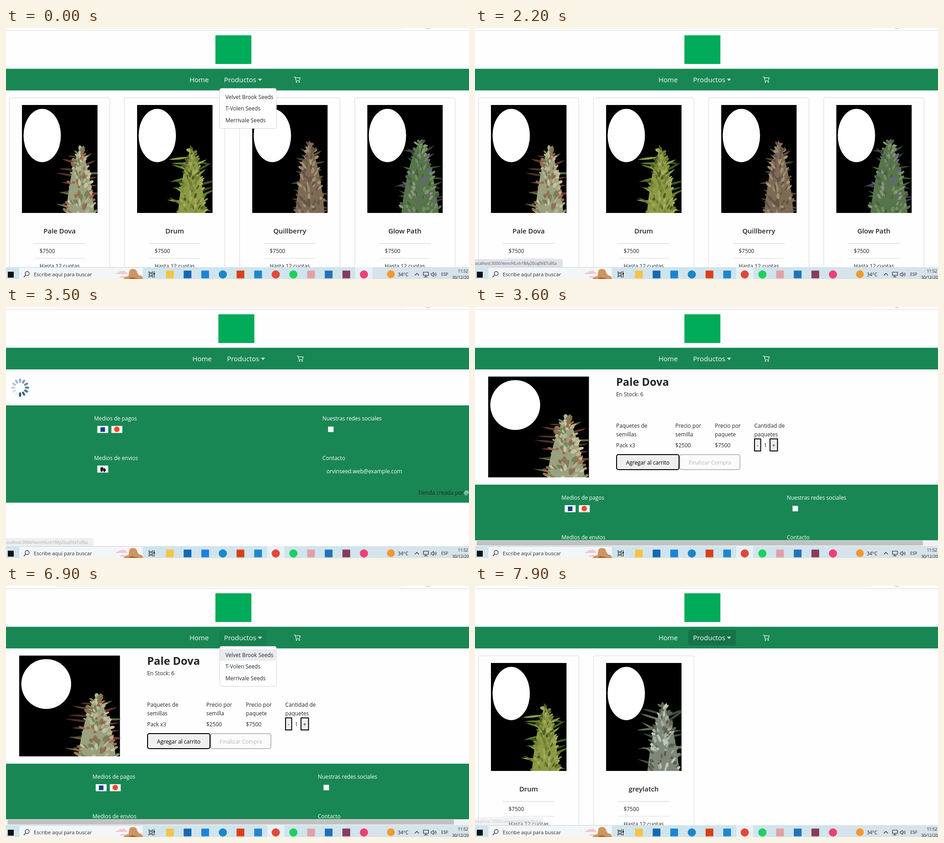
These frames come from a looping animation (1017 px wide and 551 px high, 8000 ms). An HTML page:

```html
<!DOCTYPE html>
<html lang="es">
<head>
<meta charset="utf-8">
<title>Tienda de semillas</title>
<style>
html, body { margin: 0; width: 100%; height: 100%; overflow: hidden; background: #fefefe; }
svg { display: block; width: 1017px; height: 551px; }
text { font-family: "Open Sans", "Noto Sans", sans-serif; white-space: pre; }
</style>
</head>
<body>
<svg id="stage" viewBox="0 0 1017 551" width="1017" height="551"></svg>
<script>
const GREEN = '#198754', INK = '#212529', BODY = 11.9, NAV = 14.95;
const LOOP = 8000, TICK = 100;

const rect = (x, y, w, h, fill, extra = '') =>
  `<rect x="${x}" y="${y}" width="${w}" height="${h}" fill="${fill}" ${extra}/>`;
const disc = (x, y, r, fill) => `<circle cx="${x}" cy="${y}" r="${r}" fill="${fill}"/>`;
const label = (x, y, str, fill = INK, size = BODY, extra = '') =>
  `<text x="${x}" y="${y}" fill="${fill}" font-size="${size}" ${extra}>${str}</text>`;
const line = (d, stroke, width = 1, extra = '') =>
  `<path d="${d}" fill="none" stroke="${stroke}" stroke-width="${width}" ${extra}/>`;
const group = (id, inner, extra = '') => `<g id="${id}" ${extra}>${inner}</g>`;
const centered = 'text-anchor="middle"';

function random(seed) {
  return () => (seed = (seed * 16807) % 2147483647) / 2147483647;
}

// Plant pictures, drawn on a 166 x 237 black sheet
const plants = {
  pale:  { seed: 77,  x: 128, y: 93, w: 31, reach: 44, buds: ['#9aa17f', '#b9b491', '#8a6b4f', '#6f8558', '#c6c2a2', '#9c6c50'], leaves: ['#4b3128', '#5f6b3c', '#6b3a2c'] },
  drum:  { seed: 191, x: 120, y: 93, w: 30, reach: 48, buds: ['#8d9a45', '#6f7f33', '#a8ab5e', '#4d5c24', '#7c8a3e'], leaves: ['#5d7a2a', '#8aa04a', '#3f571f'] },
  berry: { seed: 310, x: 127, y: 85, w: 32, reach: 30, buds: ['#7d6a55', '#9b8a72', '#5c5a3c', '#84684f', '#6b4d57', '#a3946f'], leaves: ['#4a4a2c', '#6a4a3c'] },
  glow:  { seed: 428, x: 116, y: 78, w: 41, reach: 42, buds: ['#56754a', '#728f5e', '#66677a', '#476239', '#8a967c'], leaves: ['#2f4a2a', '#4a6a3c', '#44404f'] },
  latch: { seed: 533, x: 126, y: 91, w: 35, reach: 52, buds: ['#7d8878', '#a6ada0', '#55624f', '#c2c5bd', '#6a5f4c'], leaves: ['#5f6f58', '#414d3c', '#7d8a76'] }
};

function plant({ seed, x, y, w, reach, buds, leaves }) {
  const rnd = random(seed * 9973);
  const pick = list => list[Math.floor(rnd() * list.length)];
  const half = v => 4 + w * Math.pow(v, 0.65);
  let out = '';
  for (let i = 0; i < 18; i++) {
    const v = 0.15 + 0.85 * i / 17, side = i % 2 ? 1 : -1;
    const len = half(v) * 0.6 + reach * (0.45 + 0.5 * rnd());
    const turn = side * (50 + 55 * rnd());
    out += `<path d="M0 0Q5 ${-len / 2} 0 ${-len}Q-5 ${-len / 2} 0 0" fill="${pick(leaves)}" transform="translate(${x} ${y + v * (237 - y)}) rotate(${turn})"/>`;
  }
  const h = 237 - y;
  out += `<path d="M${x} ${y}Q${x + w * 0.7} ${y + h * 0.3} ${x + w} 237H${x - w}Q${x - w * 0.7} ${y + h * 0.3} ${x} ${y}" fill="${buds[0]}"/>`;
  for (let i = 0; i < 130; i++) {
    const v = rnd(), s = rnd() * 2 - 1;
    out += `<ellipse rx="${1.5 + 2 * rnd()}" ry="${3 + 5 * rnd()}" fill="${pick(buds)}" transform="translate(${x + s * half(v)} ${y + v * h}) rotate(${s * 60})"/>`;
  }
  return out;
}

const photo = (name, x, y, w, h) =>
  `<svg x="${x}" y="${y}" width="${w}" height="${h}" viewBox="0 0 166 237" preserveAspectRatio="none">` +
  rect(0, 0, 166, 237, '#000') + plant(plants[name]) +
  '<ellipse cx="44.5" cy="67" rx="41" ry="58.5" fill="#fff"/></svg>';

function card(slot, title, name) {
  const x = 7 + slot * 252.8, mid = x + 110.7;
  return rect(x + 0.5, 153, 220.5, 420, '#fefefe', 'rx="4" stroke="#d6d6d6"') +
    photo(name, x + 28, 169, 166, 237) +
    label(mid, 450.5, title, INK, 14.9, `${centered} font-weight="600"`) +
    rect(x + 54, 472.5, 113.5, 1, '#cfcfcf') +
    label(x + 66.7, 494, '$7500') +
    rect(x + 54, 505, 113.5, 1, '#dcdcdc') +
    label(x + 66.7, 526.5, 'Hasta 12 cuotas');
}

function footer(left, right, y, height) {
  const chip = (x, dy) => rect(x, y + dy, 24, 15.5, '#f6f6f6');
  const white = (x, dy, s) => label(x, y + dy, s, '#fff');
  return rect(0, y, 1017, height, GREEN) +
    white(left, 33, 'Medios de pagos') +
    chip(left + 7, 45) + rect(left + 14, y + 48, 10, 10, '#1a3f8f') +
    chip(left + 38, 45) + disc(left + 50, y + 52.5, 6, '#ee4a23') +
    white(right, 33, 'Nuestras redes sociales') +
    rect(right + 12.5, y + 46.5, 12, 12, '#fff') +
    white(left, 120, 'Medios de envios') +
    chip(left + 7, 132) +
    `<path d="M${left + 14} ${y + 136}h6v8h-6zM${left + 20.5} ${y + 138}h3l2 3v3h-5z" fill="#111"/>` +
    disc(left + 16.5, y + 144.5, 1.6, '#111') + disc(left + 22.5, y + 144.5, 1.6, '#111') +
    white(right, 120, 'Contacto') +
    white(right + 9, 149, 'orvinseed.web@example.com') +
    label(905, y + 196, 'Tienda creada por') +
    label(1006, y + 196, '@', '#fff', BODY, 'font-weight="600"');
}

function spinner() {
  let out = '';
  for (let i = 0; i < 12; i++)
    out += `<ellipse class="petal" cx="31" cy="161.8" rx="2.5" ry="5" fill="#1b5583" transform="rotate(${i * 30} 31 177)"/>`;
  return out;
}

function detail() {
  const column = (x, a, b, c) => label(x, 265, a) + label(x, 284, b) + label(x, 308, c);
  const button = (x, y, w, h, str, r, ink, edge, fill) =>
    rect(x + 1, y + 1, w - 2, h - 2, fill, `rx="${r}" stroke="${edge}" stroke-width="2"`) +
    label(x + w / 2, y + h / 2 + 5, str, ink, BODY, centered);
  return photo('pale', 29, 152.5, 221.5, 221.5) +
    label(310, 172.5, 'Pale Dova', INK, 23.7, 'font-weight="700"') +
    label(310, 195.5, 'En Stock: 6') +
    column(310, 'Paquetes de', 'semillas', 'Pack x3') +
    column(440, 'Precio por', 'semilla', '$2500') +
    column(527, 'Precio por', 'paquete', '$7500') +
    column(613.5, 'Cantidad de', 'paquetes', '') +
    button(613, 288.5, 15.5, 28.5, '-', 0, '#111', '#000', '#efefef') +
    label(634.5, 308, '1') +
    button(647, 288.5, 18.5, 28.5, '+', 0, '#111', '#000', '#efefef') +
    button(310, 323, 139, 35, 'Agregar al carrito', 4, '#000', '#000', '#efefef') +
    button(449, 323, 134, 35, 'Finalizar Compra', 4, '#b9b9b9', '#bcbcbc', '#fbfbfb') +
    footer(190, 685, 390, 122) +
    rect(0, 512, 1017, 13, '#f1f1f1') + rect(4, 513, 980, 10.5, '#c1c1c1');
}

function header() {
  const hover = (id, x, w) => rect(x, 96, w, 34.5, '#157347', `id="${id}" rx="4"`);
  return rect(0, 0, 1017, 137, '#fefefe') +
    rect(0, 5, 1017, 1, '#dcdcde') +
    rect(106, -20, 772, 21.5, '#f1f3f4', 'rx="9"') +
    '<path d="M921 0h12q-6 3 -12 0" fill="#b5c3cb"/>' +
    rect(0, 89.5, 1017, 47.5, GREEN) +
    group('bar',
      rect(460, 16, 79, 63, '#00ab59') +
      hover('homeHover', 393, 75.5) + hover('listHover', 468.5, 104.5) +
      label(403, 119, 'Home', '#fff', NAV) + label(479, 119, 'Productos', '#fff', NAV) +
      '<path d="M553.5 111.5h9l-4.500 4.500z" fill="#fff"/>' +
      line('M632.500 107.500h2.500l2.200 8h7.300l1.800-6.200h-10.500', '#fff', 1.200) +
      disc(638, 118.500, 1.400, '#fff') + disc(644, 118.500, 1.400, '#fff'));
}

function menu() {
  return rect(469.5, 132.5, 124.5, 88, '#fff', 'rx="4" stroke="#cfd2d1"') +
    rect(470, 138.5, 123.5, 25.5, '#e9ecef', 'id="itemHover"') +
    ['Velvet Brook Seeds', 'T-Volen Seeds', 'Merrivale Seeds']
      .map((s, i) => label(482, 156 + i * 25.4, s)).join('');
}

function taskbar() {
  const ink = '#1c1c1c';
  const icons = [
    ['s', '#f6c445'], ['s', '#1668b0'], ['s', '#1b84d8'], ['c', '#1c86c4'], ['s', '#dc3e15'],
    ['s', '#1f86cc'], ['c', '#e2483a'], ['c', '#1ed05f'], ['s', '#e3a0a4'], ['s', '#2272b8'],
    ['s', '#8a3a5a'], ['c', '#ee3f73']
  ];
  return rect(0, 525, 1017, 26, '#d0e4ee') + rect(790, 525, 227, 26, '#d6e3ea') +
    rect(574, 525, 37.5, 26, '#e6f1f6', 'id="browserTab"') +
    rect(767, 525, 38, 26, '#e6f1f6', 'id="recorderTab"') +
    rect(29.5, 525, 271, 26, '#f3f6f8') + rect(29.5, 525, 271, 1, '#c9ced1') +
    rect(4, 535, 13, 13, '#111') +
    `<circle cx="46.500" cy="539" r="4.300" fill="none" stroke="${ink}" stroke-width="1.200"/>` +
    line('M43.500 542l-4.500 5', ink, 1.300) +
    label(61, 545, 'Escribe aquí para buscar', '#2b2b2b', 11.2) +
    '<path d="M241 540q2-4 6-3q3-5 8-3q5-4 8 2q3 0 3 4zM250 548q2-4 7-3q4-2 7 3z" fill="#f3c6d0"/>' +
    '<path d="M258 551q3-6 11-6l2-11q1-5 8-5q8 0 9 8l4 6q8 0 9 8z" fill="#cf9560"/>' +
    '<path d="M270 551q2-5 9-4l12 4z" fill="#a96b3e"/>' +
    line('M314 534v3h8v-3M314 548v-3h8v3M314.500 539h7v4h-7zM325.500 534v14', ink, 1.200) +
    rect(324, 538, 3, 3, ink) +
    icons.map(([kind, fill], i) => {
      const x = 360 + i * 38.75;
      return kind === 'c' ? disc(x, 541, 9, fill) : rect(x - 8.5, 532.5, 17, 17, fill, 'rx="1"');
    }).join('') +
    disc(845.5, 540.5, 8.5, '#f19a2c') +
    label(860.5, 545, '34°C', ink, 10.6) +
    line('M898 543l4.500-4.500l4.500 4.500', ink, 1.200) +
    line('M917 536h11v7h-11zM922 543v3M918 546.500h8', ink, 1.200) +
    `<path d="M934 539h2l3-3v10l-3-3h-2z" fill="none" stroke="${ink}"/>` +
    line('M941 538.500q2 2.500 0 5M943.500 537q3 4 0 8', ink) +
    label(956, 544, 'ESP', ink, 8.8) +
    label(992.5, 537, '11:52', ink, 8.8) + label(980, 551, '30/12/2022', ink, 8.8);
}

const status = group('status',
  '<path id="tip" fill="#dee1e6" stroke="#cdd0d4" stroke-width=".6"/>' +
  '<text id="url" x="-2.200" y="520" fill="#55595e" font-size="8.600"></text>');

document.getElementById('stage').innerHTML =
  rect(0, 0, 1017, 551, '#fefefe') +
  group('catalog', card(0, 'Pale Dova', 'pale') + card(1, 'Drum', 'drum') +
    card(2, 'Quillberry', 'berry') + card(3, 'Glow Path', 'glow')) +
  group('category', card(0, 'Drum', 'drum') + card(1, 'greylatch', 'latch')) +
  group('loading', spinner() + footer(193.5, 695, 216, 213.5)) +
  group('detail', detail()) +
  header() + group('menu', menu()) + status + taskbar();

const el = id => document.getElementById(id);
const petals = [...document.querySelectorAll('.petal')];
const fade = (id, v) => el(id).setAttribute('opacity', v);
const show = (id, on) => el(id).setAttribute('display', on ? 'inline' : 'none');

// Value of the last [time, value] step reached
function at(t, steps) {
  let value = steps[0][1];
  for (const [time, v] of steps) if (t >= time) value = v;
  return value;
}

const host = 'localhost:3000';
const tips = {
  home: [host, 60],
  opening: [host + '/item/k7Rw', 118],
  other: [host + '/item/k7RwTq2mXe95BdWn0GzU', 202],
  item: [host + '/item/HLnh1lMy20cq0V47u9Sa', 192],
  category: [host + '/category/Velvet Brook', 150]
};
const pages = [[0, 'catalog'], [2900, 'loading'], [3600, 'detail'], [7500, 'loading'], [7900, 'category']];
const tipName = [[0, 'home'], [1800, 'opening'], [1900, 'other'], [2200, 'item'], [5200, 'home'], [6900, 'category']];
const tipFade = [[0, 0], [900, 0.5], [1000, 1], [3500, 0.5], [3600, 0], [5400, 0.5], [5500, 1],
  [6400, 0.5], [6500, 0], [7000, 0.5], [7100, 1], [7900, 0.35]];
const homeFade = [[0, 0], [5200, 0.4], [5300, 1], [6100, 0.4], [6200, 0]];
const listFade = [[0, 0], [4800, 0.5], [4900, 1], [5200, 0.5], [5300, 0], [6100, 0.6], [6200, 1],
  [6900, 0.35], [7000, 0], [7500, 1]];

function draw(time) {
  const t = Math.floor(time / TICK) * TICK;
  const page = at(t, pages);
  for (const name of ['catalog', 'category', 'loading', 'detail']) show(name, name === page);
  el('bar').setAttribute('transform', `translate(${page === 'loading' ? 6.5 : 0} 0)`);

  const head = 11 + (t - (t < 7500 ? 2900 : 7500)) * 12 / 1000;
  petals.forEach((p, i) => p.setAttribute('opacity', 1 - (((head - i) % 12 + 12) % 12) / 12));

  show('menu', t < 1300 || (t >= 6400 && t < 7500));
  show('itemHover', t >= 6900);
  fade('homeHover', at(t, homeFade));
  fade('listHover', at(t, listFade));

  const [url, width] = tips[at(t, tipName)];
  fade('status', at(t, tipFade));
  el('url').textContent = url;
  el('tip').setAttribute('d', `M-2 526V508H${width - 3}q3 0 3 3V526z`);

  show('browserTab', t >= 1300);
  show('recorderTab', t < 1300);
}

function loop() {
  draw(performance.now() % LOOP);
  requestAnimationFrame(loop);
}
loop();
</script>
</body>
</html>
```
